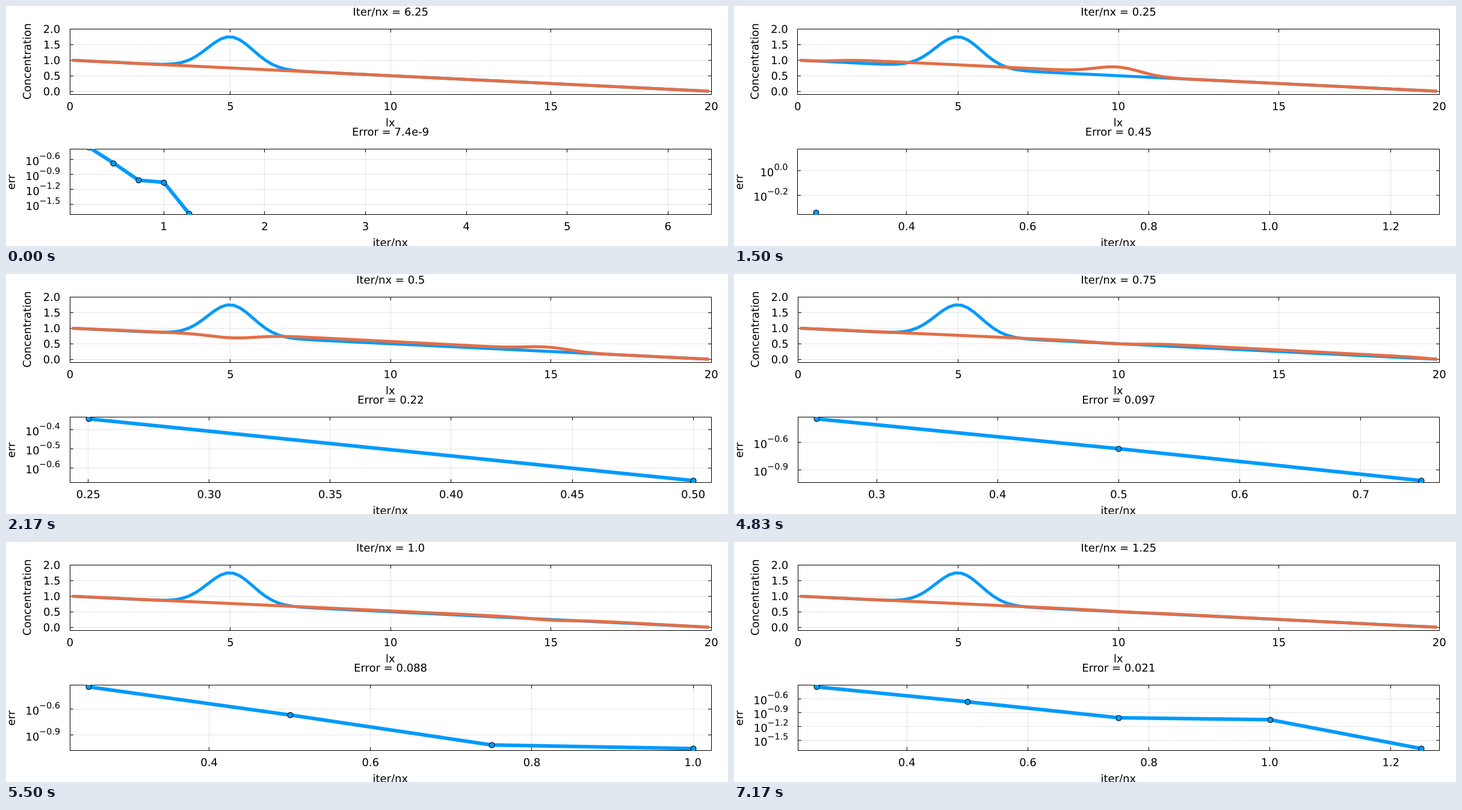
A matplotlib script that plays this animation: 1200x400 px, repeating every 8000 ms.

```python
import numpy as np
import matplotlib.pyplot as plt
from matplotlib.animation import FuncAnimation
from matplotlib.collections import LineCollection
from matplotlib.patches import PathPatch, Rectangle
from matplotlib.path import Path
from matplotlib.textpath import TextPath

W, H, DPI = 1200, 400, 100
PX = 72 / DPI                      # points per pixel
BLUE, RED = "#009AFA", "#E36F47"
RIGHT = 1172.3
TOP_Y, LOW_Y = (38.3, 147.4), (238.3, 347.4)

# ---- accelerated pseudo-transient diffusion ----
LX, NX = 20.0, 100
DX = LX / NX
CHECK = NX // 4
xc = (np.arange(NX) + 0.5) * DX
start = 1 + np.exp(-(xc - LX / 4) ** 2) - xc / LX


def diffuse(steps):
    rho = (LX / (2 * np.pi)) ** 2
    dt = DX * np.sqrt(rho)
    c, q = start.copy(), np.zeros(NX - 1)
    for _ in range(steps):
        q -= dt / (rho + dt) * (q + np.diff(c) / DX)
        c[1:-1] -= dt * np.diff(q) / DX
    return c


errors = np.log10([0.4545, 0.2153, 0.0970, 0.0881, 0.0208, 0.006])

# ---- figure in pixel coordinates, y pointing down ----
fig = plt.figure(figsize=(W / DPI, H / DPI), dpi=DPI, facecolor="white")
ax = fig.add_axes([0, 0, 1, 1])
ax.set_xlim(0, W)
ax.set_ylim(H, 0)
ax.axis("off")


def label(group, s, x, y, size=18, align="center", upright=False):
    """Write s on baseline y (or x when upright); return its left edge."""
    path = TextPath((0, 0), s, size=size, prop={"family": "DejaVu Sans"})
    box = path.get_extents()
    anchor = box.x1 if align == "right" else (box.x0 + box.x1) / 2
    u, v = path.vertices[:, 0] - anchor, path.vertices[:, 1]
    pts = (x - v, y - u) if upright else (x + u, y - v)
    patch = PathPatch(Path(np.column_stack(pts), path.codes),
                      fc="black", lw=0, zorder=3)
    group.append(ax.add_patch(patch))
    return x + box.x0 - anchor


def power_label(group, exponent, x, y):
    sign = "\u2212" if exponent < 0 else ""
    edge = label(group, f"{sign}{abs(exponent):.1f}", x, y - 1.2, 14.4, "right")
    label(group, "10", edge - 2.5, y + 9.1, align="right")


def segments(group, segs, alpha, zorder):
    lines = LineCollection(segs, colors=[(0, 0, 0, alpha)], linewidths=PX,
                           capstyle="projecting", zorder=zorder)
    lines.set_snap(False)
    group.append(ax.add_collection(lines))


def crisp(v):
    return np.floor(v) + 0.5


class Panel:
    """Boxed plot with inward ticks on all four sides."""

    def __init__(self, group, left, span, xlim, ylim):
        self.group, self.left, self.span = group, left, span
        self.xlim, self.ylim = xlim, ylim
        top, bottom = span
        self.clip = Rectangle((left, top), RIGHT - left, bottom - top,
                              transform=ax.transData)

    def x(self, v):
        a, b = self.xlim
        return self.left + (np.asarray(v) - a) / (b - a) * (RIGHT - self.left)

    def y(self, v):
        a, b = self.ylim
        top, bottom = self.span
        return bottom - (np.asarray(v) - a) / (b - a) * (bottom - top)

    def frame(self, xticks, yticks, tick=5):
        l, r = crisp(self.left), crisp(RIGHT)
        t, b = crisp(self.span[0]), crisp(self.span[1])
        grid = []
        edge = [[(l, t), (r, t), (r, b), (l, b), (l, t)]]
        for x in crisp(self.x(xticks)):
            grid.append([(x, t), (x, b)])
            edge += [[(x, t), (x, t + tick)], [(x, b), (x, b - tick)]]
        for y in crisp(self.y(yticks)):
            grid.append([(l, y), (r, y)])
            edge += [[(l, y), (l + tick, y)], [(r, y), (r - tick, y)]]
        segments(self.group, grid, 0.1, 1)
        segments(self.group, edge, 1, 1.5)

    def x_labels(self, ticks, digits):
        for v in ticks:
            label(self.group, f"{v:.{digits}f}", self.x(v), self.span[1] + 26.1)

    def titles(self, title, xlabel):
        mid = (self.left + RIGHT) / 2
        label(self.group, title, mid, self.span[0] - 22.3)
        label(self.group, xlabel, mid, self.span[1] + 53.1)

    def curve(self, xs, ys, color, width, dots=False):
        xs, ys = self.x(xs), self.y(ys)
        art = ax.plot(xs, ys, color=color, lw=width * PX, zorder=2,
                      solid_capstyle="round", solid_joinstyle="round")
        if dots:
            art += ax.plot(xs, ys, "o", ms=9 * PX, mfc=color, mec="black",
                           mew=PX, zorder=2.5)
        for a in art:
            a.set_clip_path(self.clip)
        self.group.extend(art)


def widen(lo, hi):
    pad = 0.03 * (hi - lo)
    return lo - pad, hi + pad


def scene(checks, err_text, xticks, digits, yticks, left=106.4):
    group = []
    done = checks * CHECK / NX

    top = Panel(group, left, TOP_Y, (0, LX), (-0.1, 2.0))
    xs, ys = np.arange(0, 21, 5), np.arange(0, 2.1, 0.5)
    top.frame(xs, ys)
    top.x_labels(xs, 0)
    for v in ys:
        label(group, f"{v:.1f}", left - 17.3, top.y(v) + 6.6, align="right")
    top.titles(f"Iter/nx = {done}", "lx")
    label(group, "Concentration", left - 65.2, 92.6, upright=True)
    top.curve(xc, start, BLUE, 5)
    top.curve(xc, diffuse(checks * CHECK), RED, 5)

    n = min(checks, len(errors))
    its, errs = 0.25 * np.arange(1, n + 1), errors[:n]
    if checks == 1:                # a single point spans one unit
        xlim = widen(0.25, 1.25)
        ylim = widen(errs[0], np.log10(10 ** errs[0] + 1))
    else:
        xlim = widen(0.25, done)
        ylim = widen(errs[-1], errs[0]) if checks == n else (-1.7, -0.387)
    low = Panel(group, left, LOW_Y, xlim, ylim)
    low.frame(xticks, yticks)
    low.x_labels(xticks, digits)
    for v in yticks:
        power_label(group, v, left - 17.3, low.y(v))
    low.titles(f"Error = {err_text}", "iter/nx")
    label(group, "err", 14.8, 293, upright=True)
    low.curve(its, errs, BLUE, 6, dots=True)
    return group


fifths = np.arange(0.4, 1.3, 0.2)
deep = [-0.6, -0.9, -1.2, -1.5]
scenes = [
    scene(25, "7.4e-9", np.arange(1, 7), 0, deep),
    scene(1, "0.45", fifths, 1, [0.0, -0.2], left=105.9),
    scene(2, "0.22", np.arange(0.25, 0.51, 0.05), 2, [-0.4, -0.5, -0.6]),
    scene(3, "0.097", np.arange(0.3, 0.71, 0.1), 1, deep[:2]),
    scene(4, "0.088", fifths[:4], 1, deep[:2]),
    scene(5, "0.021", fifths, 1, deep),
]
starts = [0, 500, 2170, 3830, 5500, 7170]
STEP, LOOP = 20, 8000


def update(i):
    now = i * STEP + STEP / 2
    active = np.searchsorted(starts, now, side="right") - 1
    for k, group in enumerate(scenes):
        for art in group:
            art.set_visible(k == active)
    return []


anim = FuncAnimation(fig, update, frames=LOOP // STEP, interval=STEP,
                     init_func=lambda: update(0), repeat=True,
                     repeat_delay=0, blit=False)
plt.show()
```
